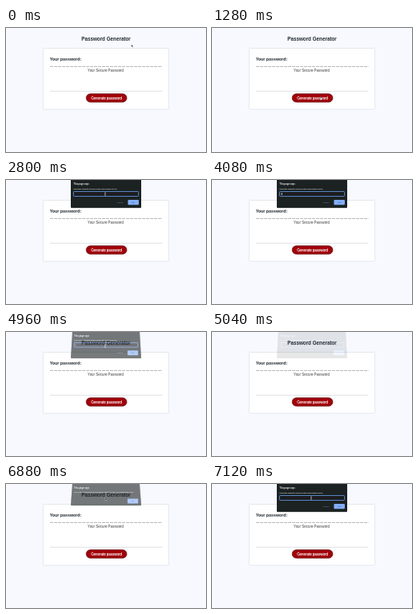
Animation, 250 px wide and 156 px high, one loop 8000 ms. Source, as an HTML page:

```html
<!DOCTYPE html>
<html lang="en">
<head>
<meta charset="utf-8">
<title>Password Generator</title>
<style>
  html, body { margin: 0; width: 100%; height: 100%; overflow: hidden; background: #f7f9ff; }
  svg { display: block; width: 100vw; height: 100vh; }
  text { font-family: "Liberation Sans", Arial, sans-serif; }
  .head { font-weight: 700; fill: #1f282e; }
  .says { font: 500 2.9px Roboto, sans-serif; fill: #fff; }
  .msg { font-family: Roboto, sans-serif; font-weight: 500; fill: #f1f3f4; }
</style>
</head>
<body>
<svg viewBox="0 0 250 156">
  <defs>
    <filter id="soft" x="-10%" y="-10%" width="120%" height="125%">
      <feDropShadow dx="0" dy=".5" stdDeviation=".7" flood-color="#000" flood-opacity=".28"/>
    </filter>
  </defs>
  <rect width="250" height="156" fill="#f7f9ff"/>
  <text class="head" x="125" y="16" font-size="6.3" text-anchor="middle">Password Generator</text>

  <rect x="46.5" y="25.5" width="157" height="76.7" rx=".8" fill="#fff" stroke="#e3e6eb" stroke-width=".9"/>
  <text class="head" x="54.7" y="41" font-size="5.3">Your password:</text>
  <path d="M55 48.5H195.5" stroke="#adb1b5" stroke-width=".9" stroke-dasharray="4 1"/>
  <path d="M55 79.5H195.5" stroke="#dcdfe3" stroke-width=".9"/>
  <text x="124.6" y="55.4" font-size="4.45" text-anchor="middle" fill="#3c3c3c">Your Secure Password</text>
  <rect x="100.2" y="82.8" width="50.8" height="10.4" rx="5.2" fill="#a2020a" stroke="#5e1419" stroke-width=".7"/>
  <text x="125.5" y="89.5" font-size="4.45" text-anchor="middle" fill="#fff" stroke="#fff" stroke-width=".12">Generate password</text>

  <g id="dialog">
    <path id="panel" fill="#1f2024" filter="url(#soft)"/>
    <g id="content">
      <text class="says" x="84.3" y="6.3">This page says</text>
      <g id="prompt">
        <text class="msg" x="84.3" y="11.9" font-size="2.1">How many characters would you like your password to be?</text>
        <rect x="84.4" y="14.5" width="81.2" height="6" rx=".8" fill="#1c1d20" stroke="#5f8fd8" stroke-width=".9"/>
        <path id="typed" d="M86.3 16.2V18.8" stroke="#9aa0a6" stroke-width=".5"/>
        <path id="caret" d="M87.5 16V19" stroke="#e8eaed" stroke-width=".6"/>
        <text x="142.5" y="29" font-size="2.4" text-anchor="middle" fill="#8ab4f8" opacity=".8">Cancel</text>
      </g>
      <text id="alert" class="msg" x="84" y="11.9" font-size="2.45">Your password must be a number between 8 and 128 characters long.</text>
      <g id="ok">
        <rect x="152.4" y="24.9" width="13.6" height="6.4" rx="1" fill="#82aef8"/>
        <text x="159.2" y="28.9" font-size="2.4" text-anchor="middle" fill="#202124">OK</text>
      </g>
    </g>
  </g>

  <g id="pointer">
    <path id="arrow" d="M0 0V3.2L.8 2.5 1.4 3.8 1.9 3.5 1.4 2.3H2.3Z" fill="#111" stroke="#fff" stroke-width=".35"/>
    <path id="hand" d="M-.4 -1.2H.3V.2L1.7 .6V1.7L1.1 2.8H-.8L-1.7 1L-.4 1.2Z" fill="#fff" stroke="#222" stroke-width=".35"/>
    <path id="beam" d="M-.7 -1.6H.7M0 -1.6V1.6M-.7 1.6H.7" stroke="#eef0f3" stroke-width=".6"/>
  </g>
</svg>
<script>
const LOOP = 8000, STEP = 80;
const el = id => document.getElementById(id);
const show = (id, on) => el(id).style.display = on ? "" : "none";
const ease = p => p * p * (3 - 2 * p);
const mix = (a, b, p) => a + (b - a) * p;

// start time, dialog kind, opacity
const dialogs = [
  [0, "", 0],
  [1600, "prompt", 1],
  [4960, "prompt", .6], [5040, "prompt", .1], [5120, "alert", .92], [5200, "alert", 1],
  [6880, "alert", .6], [6960, "alert", .1], [7040, "prompt", .92], [7120, "prompt", 1]
];

// start, end, from x, y, to x, y
const moves = [
  [240, 1120, 156.8, 20.8, 136, 87],
  [1120, 1280, 136, 87, 136, 87.8],
  [2000, 2800, 136, 87.8, 124, 17.6]
];

const dialogAt = t => dialogs.filter(d => t >= d[0]).pop();

function pointerAt(t) {
  let move = moves[0];
  for (const m of moves) if (t >= m[0]) move = m;
  const [start, end, x0, y0, x1, y1] = move;
  const p = ease(Math.min(1, Math.max(0, (t - start) / (end - start))));
  return [mix(x0, x1, p), mix(y0, y1, p)];
}

function drawDialog(t) {
  const [, kind, alpha] = dialogAt(t);
  show("dialog", kind);
  if (!kind) return;
  const isPrompt = kind === "prompt", leaving = alpha < .7;
  const h = (isPrompt ? 35 : 29) - (leaving ? 2 : 0);
  const inset = leaving ? 2 : 0;
  el("dialog").setAttribute("opacity", alpha);
  el("panel").setAttribute("d",
    `M${81 + inset} -1H${169 - inset}L169 ${h - 1}Q169 ${h} 168 ${h}H82Q81 ${h} 81 ${h - 1}Z`);
  el("content").setAttribute("transform",
    leaving ? "translate(2.5 -.2) scale(.98 .94)" : "");
  show("prompt", isPrompt);
  show("alert", !isPrompt);
  el("ok").setAttribute("transform", isPrompt ? "" : "translate(0 -5.1)");
  show("typed", t >= 4080 && t < 5120);
  show("caret", t >= 4080 && t < 4560);
}

function drawPointer(t) {
  const [x, y] = pointerAt(t);
  const onButton = y > 82 && t < 2160;
  const onInput = t >= 2720 && dialogAt(t)[1] === "prompt";
  show("pointer", t < 4080 || t >= 4960);
  show("hand", onButton);
  show("beam", onInput);
  show("arrow", !onButton && !onInput);
  const press = t >= 1440 && t < 1600 ? .92 : 1;
  el("pointer").setAttribute("transform", `translate(${x} ${y}) scale(${press})`);
}

function draw(now) {
  const t = Math.floor(now % LOOP / STEP) * STEP;
  drawDialog(t);
  drawPointer(t);
}

const began = performance.now();
function tick() {
  draw(performance.now() - began);
  requestAnimationFrame(tick);
}
tick();
</script>
</body>
</html>
```
